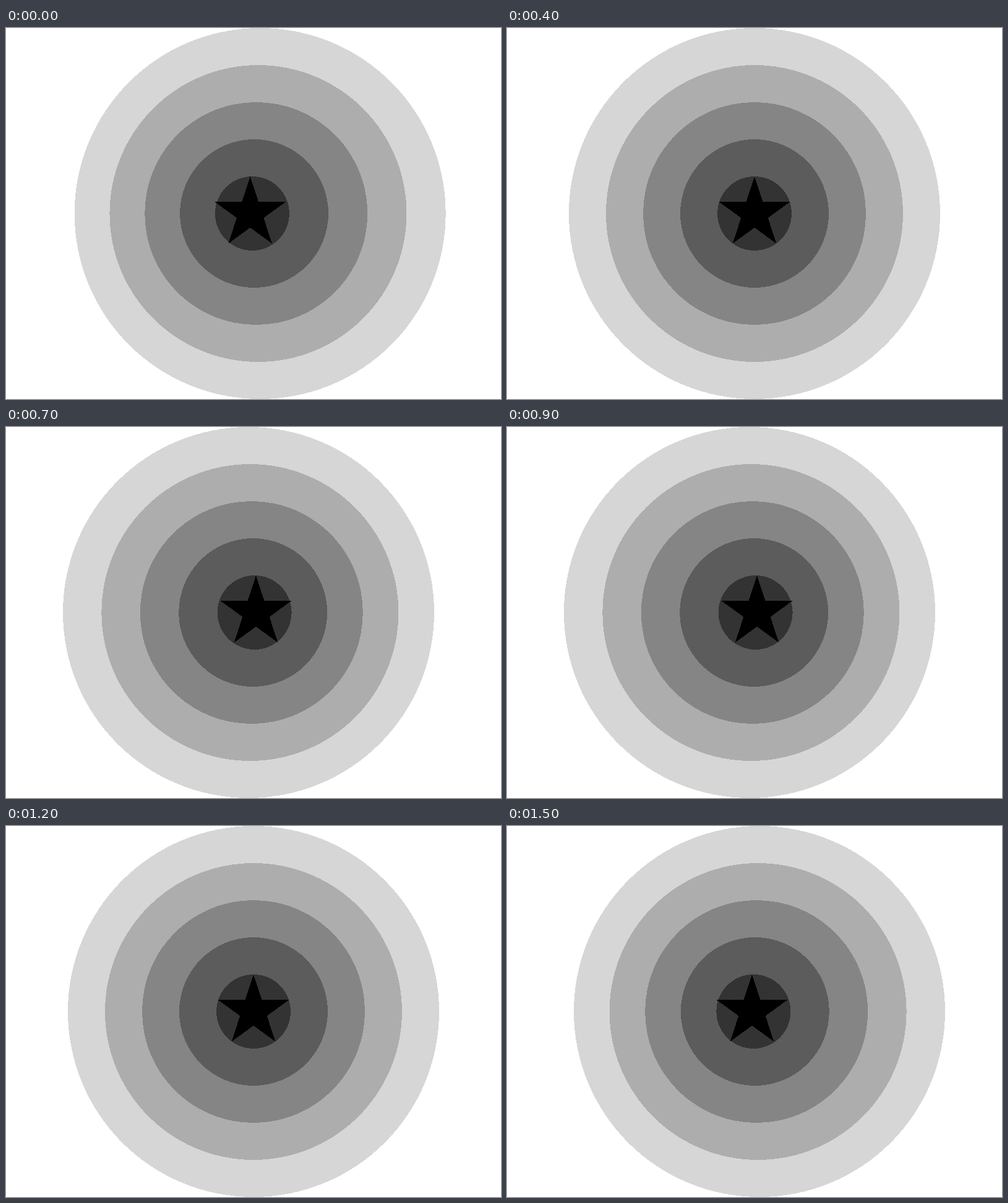
An HTML page that plays this animation: 800 by 600 pixels, repeating every 1.6 s.

```html
<!DOCTYPE html>
<html lang="en">
<head>
<meta charset="utf-8">
<title>Swaying rings</title>
<style>
  html, body { margin: 0; width: 100%; height: 100%; overflow: hidden; background: #fff; }
  svg { display: block; shape-rendering: crispEdges; }
</style>
</head>
<body>
<svg id="stage" width="800" height="600" viewBox="0 0 800 600"></svg>
<script>
  const stage = document.getElementById('stage');
  const CX = 400, CY = 300, LOOP = 1600;
  const grays = [214, 173, 133, 92, 51];

  // Sway falls evenly from the outer ring to the star, changing sign on the way.
  const sway = layer => 32 / 3 - 3.2 * layer;

  function add(tag, attrs) {
    const el = document.createElementNS('http://www.w3.org/2000/svg', tag);
    for (const name in attrs) el.setAttribute(name, attrs[name]);
    return stage.appendChild(el);
  }

  function starPath(cx) {
    const inner = 60 * (3 - Math.sqrt(5)) / 2;
    const points = Array.from({ length: 10 }, (_, i) => {
      const a = i * Math.PI / 5, r = i % 2 ? inner : 60;
      return (cx + r * Math.sin(a)).toFixed(3) + ' ' + (CY - r * Math.cos(a)).toFixed(3);
    });
    return 'M' + points.join('L') + 'Z';
  }

  // Eight even steps from right to left, then eight back.
  function swing(el, prop, layer, value) {
    const a = sway(layer);
    el.animate([a, -a, a].map(dx => ({ [prop]: value(CX + dx), easing: 'steps(8)' })),
      { duration: LOOP, iterations: Infinity });
  }

  grays.forEach((g, i) => {
    const ring = add('circle', { cx: CX + sway(i), cy: CY, r: 300 - 60 * i, fill: `rgb(${g},${g},${g})` });
    swing(ring, 'cx', i, x => x + 'px');
  });

  const star = add('path', { d: starPath(CX + sway(5)), fill: '#000' });
  swing(star, 'd', 5, x => `path("${starPath(x)}")`);
</script>
</body>
</html>
```
